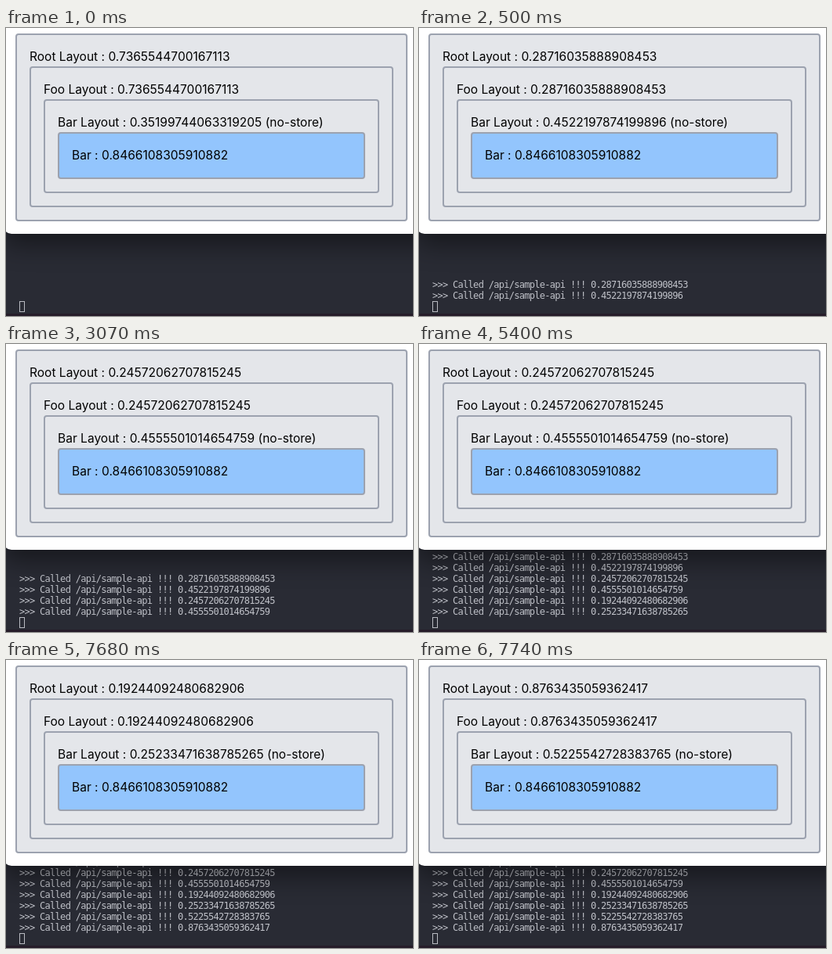
These frames come from a looping animation (519x368 px, 8000 ms). An HTML page:

```html
<!DOCTYPE html>
<html lang="en">
<head>
<meta charset="utf-8">
<style>
html, body { margin: 0; width: 100%; height: 100%; overflow: hidden; }
body { position: relative; background: #292b34; }
#log, #cursor, #strip, #page { position: absolute; box-sizing: border-box; }
#log {
  left: 17px; top: 349px; margin: 0; transform: translateY(-100%);
  font: 12px/14px "DejaVu Sans Mono", monospace; letter-spacing: -.71px; color: #bfc1c8;
}
#cursor { left: 17px; top: 349px; width: 7px; height: 14px; border: 1px solid #b9bbc2; }
#strip { left: 0; right: 0; bottom: 0; height: 3px; background: #251c29; }
#page {
  left: -3px; top: -30px; width: 600px; height: 293px; background: #fff;
  border-radius: 10px; box-shadow: 0 14px 32px rgba(0, 0, 0, .44);
}
#page > .box { position: absolute; left: 15px; top: 37px; width: 500px; }
.box {
  box-sizing: border-box; padding: 16px; border: 2px solid #9ca2af;
  border-radius: 4px; background: #e4e6ea; color: #000; white-space: nowrap;
  font: 15.5px/24px Inter, sans-serif; letter-spacing: .02px;
}
.box .bar { background: #93c5fd; }
</style>
</head>
<body>
<pre id="log"></pre>
<div id="cursor"></div>
<div id="strip"></div>
<div id="page">
  <div class="box">Root Layout : <span id="root"></span>
    <div class="box">Foo Layout : <span id="foo"></span>
      <div class="box">Bar Layout : <span id="layout"></span> (no-store)
        <div class="box bar">Bar : 0.8466108305910882</div>
      </div>
    </div>
  </div>
</div>
<script>
const LOOP = 8000;
// Each reload logs two API calls, then shows their values on the page.
const reloads = [
  { log: 500, show: 500, calls: ["0.28716035888908453", "0.4522197874199896"] },
  { log: 3010, show: 3070, calls: ["0.24572062707815245", "0.4555501014654759"] },
  { log: 5400, show: 5460, calls: ["0.19244092480682906", "0.25233471638785265"] },
  { log: 7680, show: 7740, calls: ["0.5225542728383765", "0.8763435059362417"], swapped: true }
];
const initial = ["0.7365544700167113", "0.35199744063319205"];

function setText(id, text) {
  const el = document.getElementById(id);
  if (el.textContent !== text) el.textContent = text;
}

function draw(t) {
  const lines = reloads.filter(r => t >= r.log).flatMap(r => r.calls);
  setText("log", lines.map(v => ">>> Called /api/sample-api !!! " + v).join("\n"));

  const shown = reloads.filter(r => t >= r.show).pop();
  let [root, layout] = shown ? shown.calls : initial;
  if (shown && shown.swapped) [root, layout] = [layout, root];
  setText("root", root);
  setText("foo", root);
  setText("layout", layout);
}

const start = performance.now();
function frame() {
  draw((performance.now() - start) % LOOP);
  requestAnimationFrame(frame);
}
frame();
</script>
</body>
</html>
```
